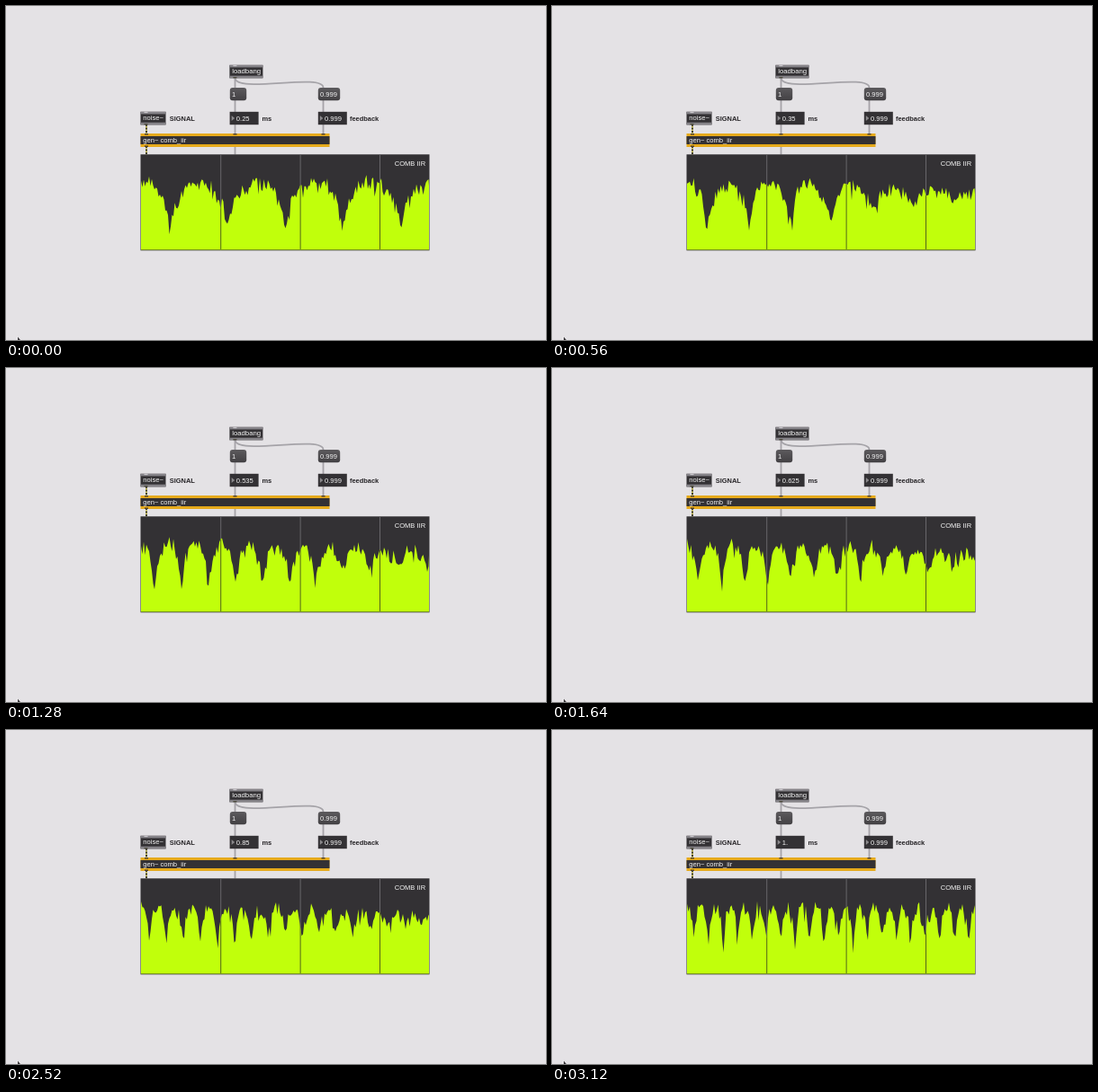
These frames come from a looping animation (600 by 372 pixels, 3.16 s). An HTML page with a canvas:

```html
<!DOCTYPE html>
<html lang="en">
<head>
<meta charset="utf-8">
<title>Comb IIR</title>
<style>
html, body { margin: 0; width: 100%; height: 100%; overflow: hidden; background: #e4e2e5; }
canvas { display: block; width: 600px; height: 372px; }
</style>
</head>
<body>
<canvas id="stage" width="600" height="372"></canvas>
<script>
const ctx = document.getElementById('stage').getContext('2d');
const LOOP = 3160, STEP = 40, FRAMES = LOOP / STEP;
const DARK = '#333134', GREY = '#858388', CORD = '#a5a3a8', AMBER = '#e6aa1c', LIME = '#c1ff0b';
const SCOPE = { x: 150, y: 166, right: 470, bottom: 271.5 };
const DELAYS = [[0, 0.25], [560, 0.35], [840, 0.43], [1280, 0.535], [2000, 0.71], [2520, 0.85], [3120, 1]];

function delayAt(t) {
  for (let i = 1; i < DELAYS.length; i++) {
    const [t0, a] = DELAYS[i - 1], [t1, b] = DELAYS[i];
    if (t <= t1) return Math.round((a + (b - a) * (t - t0) / (t1 - t0)) * 200) / 200;
  }
  return 1;
}

function rect(x, y, w, h, color) {
  ctx.fillStyle = color;
  ctx.fillRect(x, y, w, h);
}

function text(str, x, y, color, size = 7.6, weight = 'normal') {
  ctx.font = `${weight} ${size}px "Liberation Sans", Arial, sans-serif`;
  ctx.fillStyle = color;
  ctx.fillText(str, x, y);
}

function line(x, y0, y1, color = CORD, width = 1.8) {
  ctx.strokeStyle = color;
  ctx.lineWidth = width;
  ctx.beginPath();
  ctx.moveTo(x, y0);
  ctx.lineTo(x, y1);
  ctx.stroke();
}

function signal(x, y0, y1) {
  line(x, y0, y1, '#d3c95c');
  ctx.setLineDash([2, 1.5]);
  line(x, y0, y1, '#333126');
  ctx.setLineDash([]);
}

function objectBox(x, y, w, label, size) {
  rect(x, y, w, 14.5, DARK);
  rect(x, y, w, 2.6, GREY);
  rect(x, y + 11.9, w, 2.6, GREY);
  rect(x + 4, y, 4, 1.3, '#c8c6ca');
  rect(x + 4, y + 13.2, 4, 1.3, '#4c4a3c');
  text(label, x + 2.8, y + 9.6, '#f4f4f4', size);
}

function messageBox(x, w, label) {
  const fill = ctx.createLinearGradient(0, 91, 0, 105);
  fill.addColorStop(0, '#5c5a5d');
  fill.addColorStop(1, '#434144');
  ctx.fillStyle = fill;
  ctx.beginPath();
  ctx.roundRect(x, 91, w, 14.2, 3);
  ctx.fill();
  text(label, x + 2.2, 100.8, '#f4f4f4');
}

function numberBox(x, label) {
  rect(x, 117.8, 32, 14.4, DARK);
  ctx.fillStyle = '#8a888b';
  ctx.beginPath();
  ctx.moveTo(x + 2, 122);
  ctx.lineTo(x + 5.5, 125);
  ctx.lineTo(x + 2, 128);
  ctx.fill();
  text(label, x + 7.2, 127.7, '#f4f4f4');
}

function random(i, frame) {
  let h = Math.imul(i + 11, 374761393) ^ Math.imul(frame + 5, 668265263);
  h = Math.imul(h ^ (h >>> 13), 1274126177);
  h = Math.imul(h ^ (h >>> 16), 2246822519);
  return ((h ^ (h >>> 15)) >>> 0) / 4294967296;
}

// Noise power of one bin, averaged over the latest analysis windows.
function noisePower(i, frame) {
  let sum = 0;
  for (let k = 0; k < 4; k++) {
    sum -= Math.log(1 - random(i, (frame - k + FRAMES) % FRAMES));
  }
  return sum / 4 + 0.03;
}

// Comb response, with the treble loss of a fractional delay line.
function combPower(dx, delay) {
  const w = Math.PI * dx / 353;
  const frac = (delay * 44.1) % 1;
  const gain = 0.999 * Math.sqrt(1 - 2 * frac * (1 - frac) * (1 - Math.cos(w)));
  const c = Math.cos(Math.PI * dx / 16.04 * delay);
  return 0.004 + 0.013 * delay + ((1 - gain) ** 2 + 4 * gain * c * c) / 4;
}

function drawScope(frame, delay) {
  const { x, y, right, bottom } = SCOPE;
  rect(149.5, 165.3, 321, 107, DARK);
  for (let k = 1; k < 4; k++) rect(149.8 + 88.4 * k, y, 1, bottom - y, '#68666a');

  ctx.save();
  ctx.beginPath();
  ctx.moveTo(x, bottom);
  for (let i = 0, px = x; px < right + 1.5; i++, px = x + i * 1.5) {
    const power = combPower(px - x, delay) * noisePower(i, frame);
    ctx.lineTo(Math.min(px, right), 197 - 10 * Math.log(power));
  }
  ctx.lineTo(right, bottom);
  ctx.closePath();
  ctx.fillStyle = LIME;
  ctx.fill();
  ctx.clip();
  for (let k = 1; k < 4; k++) rect(149.8 + 88.4 * k, y, 1, bottom - y, '#536719');
  ctx.restore();
  text('COMB IIR', 431.7, 178.4, '#f4f4f4', 7.55);
}

function drawPatch(delay) {
  line(254.5, 80, 165.5);
  line(352.5, 104, 143);
  ctx.beginPath();
  ctx.moveTo(254.5, 80);
  ctx.bezierCurveTo(254.5, 98, 352.5, 74, 352.5, 91);
  ctx.stroke();
  signal(156, 132, 143);
  signal(156, 156, 165.5);

  objectBox(248.4, 65.8, 37, 'loadbang', 7.75);
  objectBox(149.5, 117.8, 28, 'noise~');
  messageBox(248.8, 18.4, '1');
  messageBox(346.8, 24.4, '0.999');
  numberBox(248.6, delay === 1 ? '1.' : String(delay));
  numberBox(346.8, '0.999');

  rect(149.5, 142, 210, 15, AMBER);
  rect(149.5, 145, 210, 9, DARK);
  for (const px of [154, 252.5, 350.5]) rect(px, 142, 4, 1.5, '#57462a');
  rect(154, 155.5, 4, 1.5, '#57462a');
  text('gen~ comb_iir', 152.3, 151.9, '#f4f4f4');

  text('SIGNAL', 181.7, 127.7, '#252326', 7.45, 'bold');
  text('ms', 284.5, 127.7, '#252326', 7.45, 'bold');
  text('feedback', 382, 127.7, '#252326', 7.45, 'bold');
}

function drawPointer() {
  ctx.beginPath();
  ctx.moveTo(13, 368.5);
  ctx.lineTo(13, 373);
  ctx.lineTo(16, 372);
  ctx.closePath();
  ctx.strokeStyle = '#f6f5f6';
  ctx.lineWidth = 1;
  ctx.stroke();
  ctx.fillStyle = '#39373a';
  ctx.fill();
}

function draw() {
  const frame = Math.floor((performance.now() % LOOP) / STEP);
  const delay = delayAt(frame * STEP);
  rect(0, 0, 600, 372, '#e4e2e5');
  drawPatch(delay);
  drawScope(frame, delay);
  drawPointer();
  requestAnimationFrame(draw);
}
draw();
</script>
</body>
</html>
```
